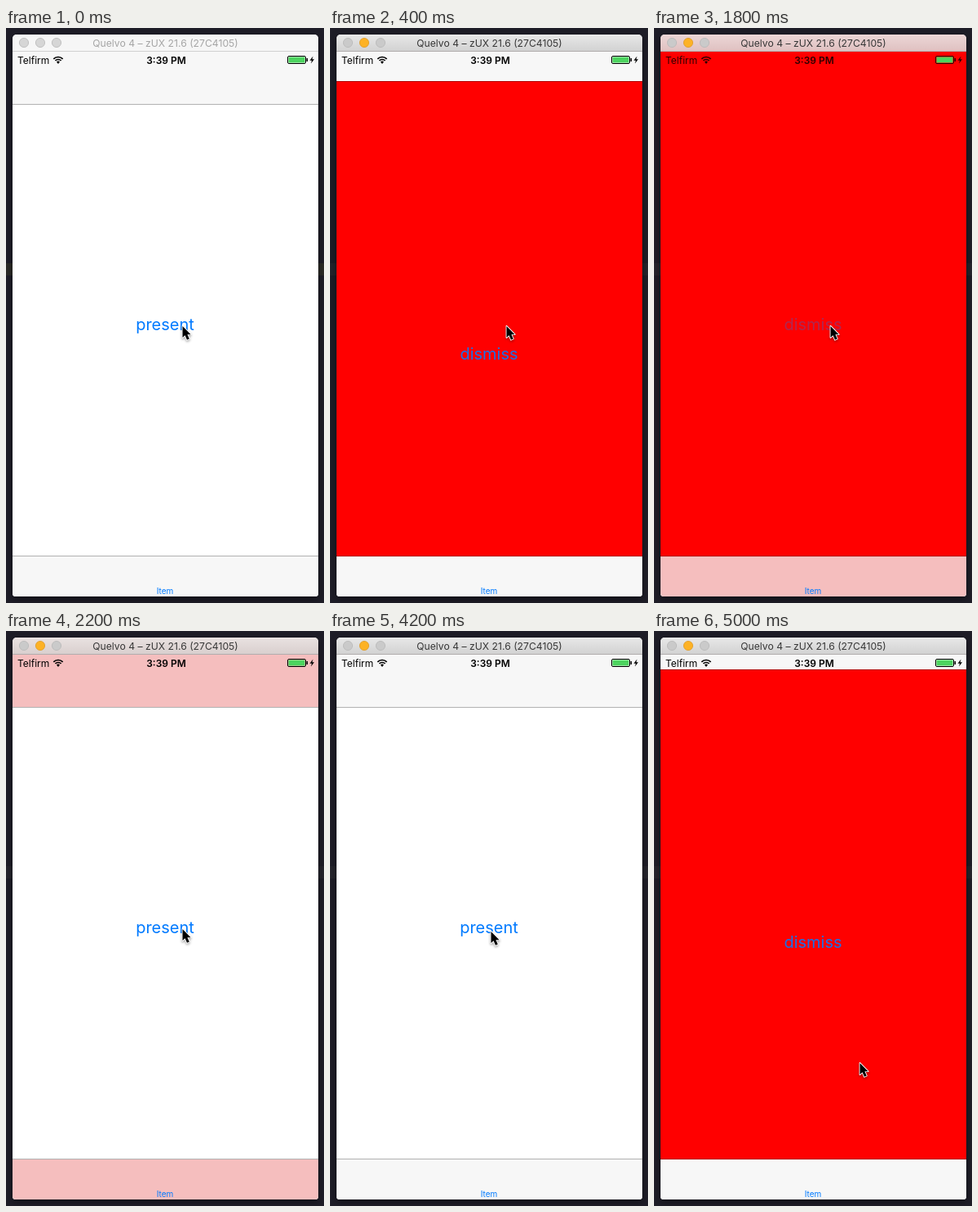
An HTML page with a canvas that plays this animation: 390 by 704 pixels, repeating every 5100 ms.

```html
<!DOCTYPE html>
<html lang="en">
<head>
<meta charset="utf-8">
<title>Modal presentation</title>
<style>
html, body { margin: 0; width: 100%; height: 100%; overflow: hidden; background: #1e1d27; }
canvas { display: block; width: 390px; height: 704px; }
</style>
</head>
<body>
<canvas id="stage" width="390" height="704"></canvas>
<script>
const ctx = document.getElementById('stage').getContext('2d');
const LOOP = 5100, STEP = 100;
const WIN = { x: 8, y: 8, w: 375, h: 688 };
const TOP = 29, NAV_LINE = 93, TAB_LINE = 646, SLIDE = 667;
const BLUE = '#007aff', BAR = '#f7f7f7', PINK = '#f5bebe', HAIRLINE = 'rgba(0,0,0,.3)';

// Pointer stops: time, x, y
const POINTER = [
  [0, 216, 365], [2400, 216, 365], [3100, 195, 366], [3700, 195, 367],
  [4400, 198, 369], [4800, 198, 369], [4900, 222, 440], [5000, 252, 529]
];

const between = (t, a, b) => t >= a && t < b;
const decay = (t, start) => Math.min(1, 3 ** (-(t - start) / 100));

function rect(x, y, w, h, color) {
  ctx.fillStyle = color;
  ctx.fillRect(x, y, w, h);
}

function text(str, x, y, size, color, weight = 400, align = 'center') {
  ctx.font = `${weight} ${size}px Inter, "Liberation Sans", sans-serif`;
  ctx.textAlign = align;
  ctx.fillStyle = color;
  ctx.fillText(str, x, y);
}

function path(points) {
  ctx.beginPath();
  points.forEach(([x, y]) => ctx.lineTo(x, y));
  ctx.closePath();
}

function sheetOffset(t) {
  if (t < 1850) return SLIDE * decay(t, 134);
  if (t < 4600) return SLIDE * (1 - decay(t, 1850));
  return SLIDE * decay(t, 4671);
}

function pointerAt(t) {
  let i = 1;
  while (i < POINTER.length - 1 && t > POINTER[i][0]) i++;
  const [t0, x0, y0] = POINTER[i - 1], [t1, x1, y1] = POINTER[i];
  const k = Math.min(1, (t - t0) / (t1 - t0));
  return [Math.round(x0 + (x1 - x0) * k), Math.round(y0 + (y1 - y0) * k)];
}

function drawDesktop(t) {
  rect(0, 0, 390, 704, '#1e1d27');
  rect(0, 288, 390, 15, t < STEP ? '#2b2a26' : '#25242c');
  ctx.save();
  ctx.shadowColor = 'rgba(0,0,0,.45)';
  ctx.shadowBlur = 8;
  ctx.shadowOffsetY = 3;
  windowPath();
  ctx.fillStyle = '#fff';
  ctx.fill();
  ctx.restore();
}

function windowPath() {
  ctx.beginPath();
  ctx.roundRect(WIN.x, WIN.y, WIN.w, WIN.h, [5, 5, 4, 4]);
}

function drawTitleBar(t) {
  const active = t >= STEP;
  let shades = ['#e8e8e8', '#d2d2d2'];
  if (!active) shades = ['#f6f6f6', '#f6f6f6'];
  else if (between(t, 600, 1900)) shades = ['#ecd6d6', '#dfc1c1'];
  else if (between(t, 1900, 2400)) shades = ['#e9e2e1', '#d9cfce'];
  const fill = ctx.createLinearGradient(0, 8, 0, 28);
  shades.forEach((c, i) => fill.addColorStop(i, c));
  rect(8, 8, 375, 20, fill);
  rect(8, 28, 375, 1, active ? '#b1adad' : '#d0d0d0');

  [22, 42, 62].forEach((x, i) => {
    const lit = active && i === 1;
    ctx.beginPath();
    ctx.arc(x, 18, 5.6, 0, 7);
    ctx.fillStyle = lit ? '#fdb225' : active ? '#cacaca' : '#d6d6d6';
    ctx.fill();
    ctx.strokeStyle = lit ? '#dd9a25' : '#b8b8b8';
    ctx.lineWidth = 0.8;
    ctx.stroke();
  });
  text('Quelvo 4 – zUX 21.6 (27C4105)', 195.5, 22.5, 12.2, active ? '#373737' : '#a5a5a5');
}

function drawStatus(onRed) {
  const ink = onRed ? 'rgba(0,0,0,.82)' : '#000';
  text('Telfirm', 14, 43.5, 12, ink, 400, 'left');
  text('3:39 PM', 196.5, 43.5, 12, ink, 600);

  ctx.strokeStyle = ink;
  ctx.lineWidth = 1.7;
  [8, 5].forEach(r => {
    ctx.beginPath();
    ctx.arc(64, 43.5, r, -2.36, -0.78);
    ctx.stroke();
  });
  ctx.fillStyle = ink;
  ctx.beginPath();
  ctx.moveTo(64, 44);
  ctx.arc(64, 43.5, 2.8, -2.36, -0.78);
  ctx.fill();

  ctx.lineWidth = 1;
  ctx.beginPath();
  ctx.roundRect(345.5, 34.5, 22, 9, 1.5);
  ctx.stroke();
  rect(346.5, 35.5, 20, 7, '#4cd45f');
  rect(368.5, 37, 1.5, 4, ink);
  path([[376.5, 34.5], [372.5, 39.8], [375, 39.8], [374, 43.5], [378, 38.2], [375.5, 38.2]]);
  ctx.fillStyle = ink;
  ctx.fill();
}

function drawPointer(x, y) {
  ctx.save();
  ctx.translate(x, y);
  path([[0.5, 0], [0.5, 14], [3.6, 11.2], [6, 16.8], [8.8, 15.5], [6.4, 10.2], [10.6, 10.2]]);
  ctx.lineJoin = 'round';
  ctx.shadowColor = 'rgba(0,0,0,.4)';
  ctx.shadowBlur = 3;
  ctx.shadowOffsetY = 1.5;
  ctx.strokeStyle = '#fff';
  ctx.lineWidth = 1.8;
  ctx.stroke();
  ctx.shadowColor = 'transparent';
  ctx.fillStyle = '#000';
  ctx.fill();
  ctx.restore();
}

function drawScreen(t) {
  const offset = Math.round(sheetOffset(t)), edge = TOP + offset;
  const tinted = between(t, 600, 2400);
  const presentPressed = between(t, 100, 300) || t >= 4600;
  const bar = tinted ? PINK : BAR;

  rect(8, TOP, 375, 667, '#fff');
  rect(8, TOP, 375, NAV_LINE - TOP, bar);
  rect(8, NAV_LINE, 375, 1, HAIRLINE);
  text('present', 195, 370, 20, presentPressed ? '#a6cdf6' : BLUE);

  if (edge < TAB_LINE) {
    rect(8, edge, 375, TAB_LINE + 1 - edge, '#ff0000');
    if (offset > 0) rect(8, edge, 375, 1, 'rgba(0,0,0,.3)');
    ctx.globalAlpha = between(t, 1800, 2100) ? 0.35 : 1;
    text('dismiss', 195, 370 + offset, 20, '#1a70e8');
    ctx.globalAlpha = 1;
  }

  rect(8, TAB_LINE + 1, 375, 49, bar);
  rect(8, TAB_LINE, 375, 1, HAIRLINE);
  text('Item', 195, 692.5, 10, BLUE);
  drawStatus(edge < 40);
}

function draw(t) {
  drawDesktop(t);
  ctx.save();
  windowPath();
  ctx.clip();
  drawScreen(t);
  drawTitleBar(t);
  ctx.restore();
  drawPointer(...pointerAt(t));
}

const begin = performance.now();
function tick() {
  const t = (performance.now() - begin) % LOOP;
  draw(Math.floor(t / STEP) * STEP);
  requestAnimationFrame(tick);
}
tick();
</script>
</body>
</html>
```
